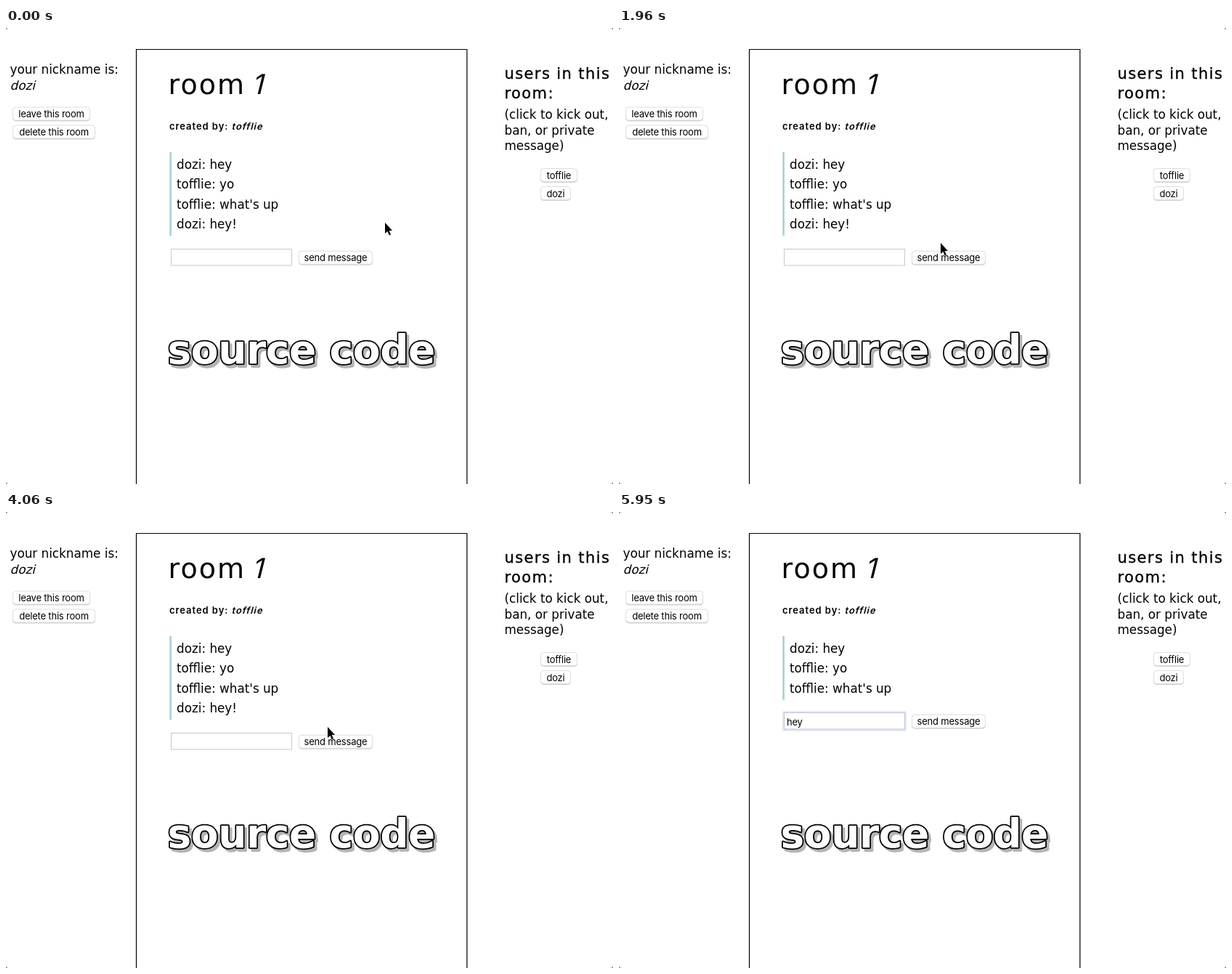
An HTML page for the animation above (6.02 s loop, 836 px wide and 628 px high).

```html
<!DOCTYPE html>
<html lang="en">
<head>
<meta charset="utf-8">
<title>chat rooms</title>
<style>
  html, body { margin: 0; width: 100%; height: 100%; overflow: hidden; background: #fff; }
  svg { display: block; width: 100%; height: 100%; }
  text { font-family: "DejaVu Sans", sans-serif; fill: #000; white-space: pre; }
  .body { font-size: 16.8px; }
  .title { font-size: 38px; letter-spacing: 2.1px; }
  .heading { font-size: 21px; letter-spacing: 1.4px; stroke: #000; stroke-width: .35px; }
  .name, .small, .ui { font-family: Inter, sans-serif; }
  .name { letter-spacing: 3.3px; }
  .small { font-size: 13px; font-weight: 600; letter-spacing: .95px; }
  .ui { font-size: 13px; letter-spacing: -.2px; }
  .banner {
    font-size: 55px; font-weight: 700; letter-spacing: -.4px;
    fill: #fff; stroke: #000; stroke-width: 3.5px; stroke-linejoin: round; paint-order: stroke;
  }
  .shade { fill: #b4b4b4; stroke: #b4b4b4; }
</style>
</head>
<body>
<svg viewBox="0 0 836 628">
  <g id="page"></g>
  <path fill="#777" fill-rule="evenodd" d="M0 0H836V628H0ZM4 0Q0 0 0 4V624Q0 628 4 628H832Q836 628 836 624V4Q836 0 832 0Z"/>
  <g id="mouse"></g>
</svg>
<script>
const LOOP = 6020, STEP = 70;
const ME = 'dozi', HOST = 'tofflie';
const rooms = {
  one: {
    title: '1', owner: HOST, users: [[HOST, 51], [ME, 42]],
    messages: [`${ME}: hey`, `${HOST}: yo`, `${HOST}: what's up`]
  },
  bub: {
    title: 'bub', owner: 'zelto', users: [['zelto', 43.5], ['fivna', 43.5], [ME, 42]],
    messages: ['hodu: hey', 'flodu: hullo']
  }
};

// Timeline: each event overrides part of the state from its time on.
const events = [];
const at = (time, change) => events.push([time, change]);
const arrow = (x, y) => ({ mouse: ['arrow', x, y] });
const beam = (x, y) => ({ mouse: ['beam', x, y] });
const type = (time, ...texts) => texts.forEach((text, i) =>
  at(time + i * STEP, { text, caret: true, mouse: null }));

const leave = time => {
  at(time, arrow(800, 60));
  at(time + STEP, arrow(51, 118));
};
const lobby = time => {
  at(time, { room: null, ...arrow(60, 160) });
  at(time + STEP, arrow(80, 249));
};
const enter = (time, focusTime) => {
  at(time, { room: 'bub', sent: false, text: '', focus: false, ...arrow(80, 249) });
  at(focusTime, { focus: true, caret: true, ...beam(298, 270) });
};
const glance = time => {
  at(time, { text: "what's up", ...arrow(793, 60) });
  at(time + STEP, beam(298, 271));
};
const switchRoom = time =>
  at(time, { room: 'one', sent: false, text: '', focus: true, caret: true, mouse: null });
const send = (time, ...pos) =>
  at(time, { sent: true, text: '', focus: false, ...arrow(...pos) });

at(0, { room: 'one', sent: true, text: '', focus: false, caret: false, ...arrow(522, 267) });
leave(70);
lobby(210);
enter(420, 560);
at(700, { caret: false });
at(770, { caret: true });
type(910, 'wha', "what's");
glance(1050);
at(1260, arrow(385, 271));
at(1330, arrow(430, 272));
at(1400, arrow(465, 270));

switchRoom(1540);
type(1610, 'h', 'he', 'hey', 'hey!');
send(1890, 452, 300);
at(1960, arrow(443, 295));
at(2100, arrow(522, 267));
leave(2170);
lobby(2310);
enter(2590, 2800);
type(3010, 'wha', "what's", "what's up");
glance(3220);
at(3430, arrow(407, 271));

switchRoom(3570);
type(3640, 'h', 'he', 'hey', 'hey!');
send(3990, 452, 300);
at(4060, arrow(443, 295));
at(4130, arrow(522, 267));
leave(4200);
lobby(4410);
enter(4690, 4830);
type(5040, 'w', 'wha', "what's");
glance(5250);
at(5460, arrow(385, 271));
at(5530, arrow(430, 272));
at(5600, arrow(465, 270));

switchRoom(5740);
type(5810, 'h', 'he');
at(5950, { text: 'hey', caret: false });

const stateAt = time => Object.assign({},
  ...events.filter(([start]) => start <= time).map(([, change]) => change));

// Drawing helpers
const text = (x, y, cls, str, extra = '') => `<text x="${x}" y="${y}" class="${cls}" ${extra}>${str}</text>`;
const slanted = (x, y, cls, str) =>
  `<g transform="translate(${x} ${y}) skewX(-14)">${text(0, 0, cls, str)}</g>`;
const rect = (x, y, w, h, style) => `<rect x="${x}" y="${y}" width="${w}" height="${h}" ${style}/>`;
const button = (x, y, w, label) =>
  rect(x + .5, y + 1, w - 1, 18.5, 'rx="4" fill="#ccc" stroke="#d0d0d0"') +
  rect(x + .5, y + .5, w - 1, 18, 'rx="4" fill="#fff" stroke="#dedede"') +
  text(x + w / 2, y + 14.5, 'ui', label, 'text-anchor="middle"');

function drawInput(y, state) {
  const glow = state.focus ? rect(225, y - 2, 171, 28, 'rx="2" fill="#e6e9f6"') : '';
  const caret = state.focus && state.caret
    ? rect(231.5, y + 5, 1.2, 15, 'id="caret"') : '';
  return glow +
    rect(227.5, y + .5, 166, 22.5, `fill="#fff" stroke="${state.focus ? '#bec2da' : '#c8c8c8'}"`) +
    text(231, y + 17.5, 'ui', state.text, 'id="typed"') + caret +
    button(403, y + 2.7, 102, 'send message');
}

function drawRoom(state) {
  const room = rooms[state.room];
  const messages = state.sent ? [...room.messages, `${ME}: hey!`] : room.messages;
  const listHeight = 5.4 + 27.4 * messages.length;
  return [
    '<path d="M179.5 628V29.5H634.9V628" fill="none" stroke="#000" stroke-width="1.2"/>',
    text(5.5, 63, 'body', 'your nickname is:'),
    slanted(5.5, 84.5, 'body', ME),
    button(9, 108.5, 107, 'leave this room'),
    button(9, 133.5, 114, 'delete this room'),
    text(223.5, 90.5, 'title', 'room'),
    slanted(338, 90.5, 'title name', room.title),
    text(225, 139.5, 'small', 'created by:'),
    slanted(310.5, 139.5, 'small', room.owner),
    rect(225.3, 171, 2.6, listHeight, 'fill="#a9d0d8"'),
    ...messages.map((line, i) => text(235, 194 + 27.4 * i, 'body', line)),
    drawInput(Math.round(194 + 27.4 * messages.length), state),
    text(222.5, 465, 'banner shade', 'source code', 'transform="translate(3.5 1)"'),
    text(222.5, 462, 'banner', 'source code'),
    text(686.5, 70, 'heading', 'users in this'),
    text(686.5, 96.5, 'heading', 'room:'),
    ...['(click to kick out,', 'ban, or private', 'message)']
      .map((line, i) => text(686.5, 125 + 21.5 * i, 'body', line)),
    ...room.users.map(([name, width], i) => button(736, 193 + 25 * i, width, name))
  ].join('');
}

const pointers = {
  arrow: '<path d="M0 1V16L3.4 12.9 5.8 18.4 8 17.4 5.7 12H10Z" stroke="#fff" stroke-width="1" paint-order="stroke"/>',
  beam: ['#fff" stroke-width="3.4', '#000" stroke-width="1.6'].map(stroke =>
    `<path d="M-4-8Q0-8 0-5V6Q0 9-4 9M4-8Q0-8 0-5V6Q0 9 4 9M-2 3H2" fill="none" stroke="${stroke}"/>`).join('')
};

const pageLayer = document.getElementById('page');
const mouseLayer = document.getElementById('mouse');
let shown = -1;

function render(time) {
  const step = Math.floor(time / STEP);
  if (step === shown) return;
  shown = step;
  const state = stateAt(step * STEP);
  pageLayer.innerHTML = state.room ? drawRoom(state) : '';
  const caret = document.getElementById('caret');
  if (caret && state.text) {
    const width = document.getElementById('typed').getComputedTextLength();
    caret.setAttribute('x', 231.3 + width);
  }
  mouseLayer.innerHTML = '';
  if (state.mouse) {
    const [kind, x, y] = state.mouse;
    mouseLayer.innerHTML = `<g transform="translate(${x} ${y})">${pointers[kind]}</g>`;
  }
}

let start;
function tick(now) {
  start ??= now;
  render((now - start) % LOOP);
  requestAnimationFrame(tick);
}
render(0);
requestAnimationFrame(tick);
</script>
</body>
</html>
```
